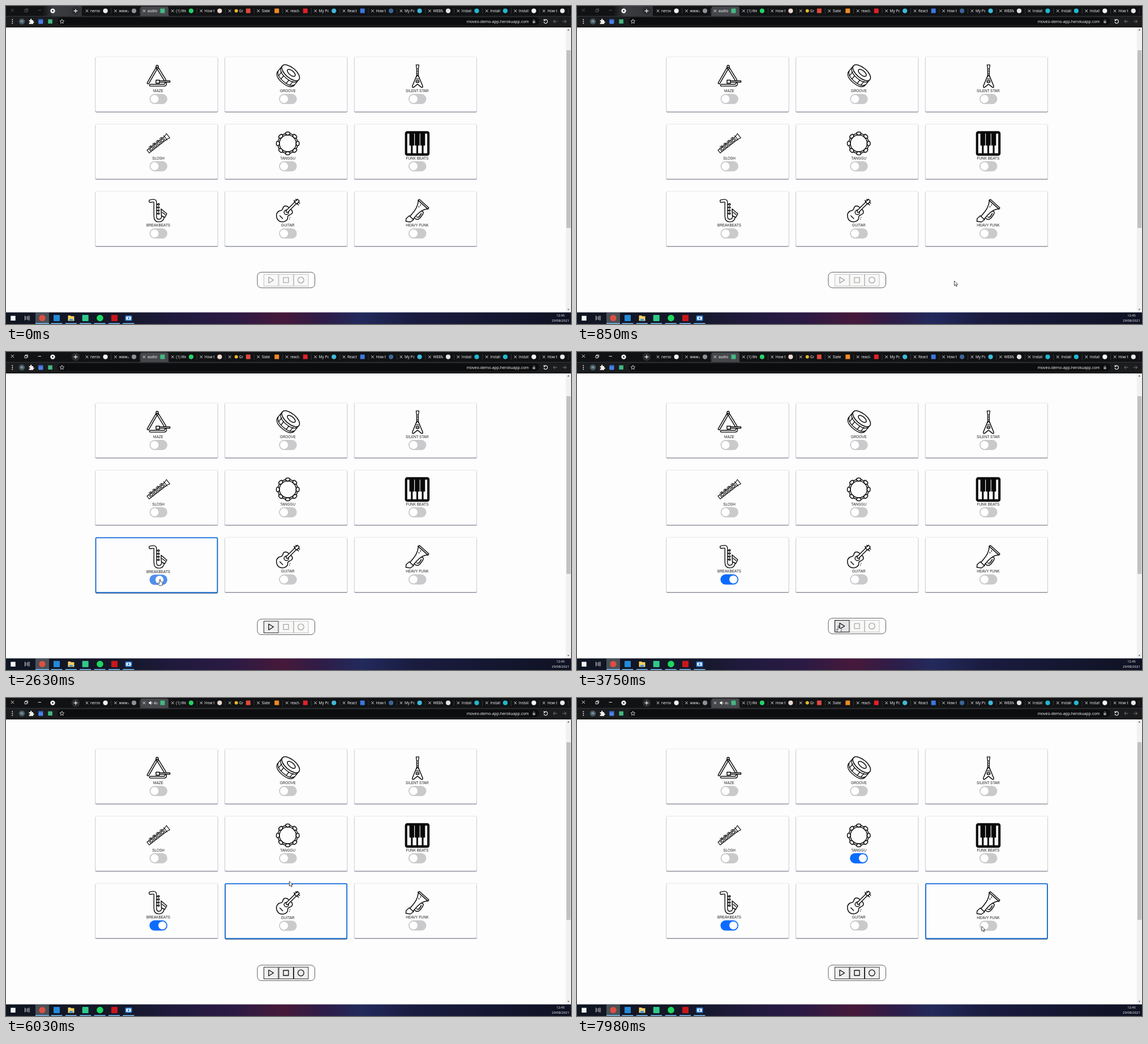
These frames come from a looping animation (998 by 561 pixels, 8 s). An HTML page:

```html
<!DOCTYPE html>
<html lang="en">
<head>
<meta charset="utf-8">
<title>Loop machine</title>
<style>
html,body{margin:0;width:100%;height:100%;overflow:hidden;background:#fdfdfd}
#stage{display:block;width:100vw;height:100vh}
text{font-family:"Open Sans","Noto Sans",sans-serif;fill:#fff;stroke:none}
.card text{font:6.4px "Liberation Sans",Arial,sans-serif;fill:#222;text-anchor:middle}
.box{fill:#fdfdfd;stroke:#d6d8e4;stroke-width:.6;filter:drop-shadow(0 1px .7px rgba(20,25,45,.6))}
.hover .box{stroke:#0b68da;stroke-width:1.7;transform:translate(.6px,.6px)}
.icon{fill:none;stroke:#0c0c0c;stroke-width:1.5;stroke-linejoin:round;stroke-linecap:round}
.btn rect{fill:#f8f8f6;stroke:#c3c3c6;stroke-width:1}
.btn path{fill:none;stroke:#98989c;stroke-width:1.1;stroke-linejoin:round}
.btn.on rect{fill:#efefef;stroke:#2a2a2a}
.btn.on path{stroke:#0a0a0a;stroke-width:1.3}
.btn.over rect{fill:#e4e4e6;stroke:#000}
.win{stroke:#f4f4f4;fill:none;stroke-width:.9}
.idle .win{stroke:#5c5c5c}
#glow{visibility:hidden}
.idle #glow{visibility:visible}
.cur path{fill:#fff;stroke:#111;stroke-width:.75;stroke-linejoin:round}
</style>
</head>
<body>
<svg id="stage" viewBox="0 0 998 561" preserveAspectRatio="none">
  <defs>
    <linearGradient id="bar">
      <stop offset="0" stop-color="#101522"/><stop offset=".22" stop-color="#15182b"/>
      <stop offset=".29" stop-color="#1f1a3c"/><stop offset=".4" stop-color="#2b1a44"/>
      <stop offset=".49" stop-color="#46193a"/><stop offset=".56" stop-color="#2e1c48"/>
      <stop offset=".63" stop-color="#222a5c"/><stop offset=".72" stop-color="#1a1c40"/>
      <stop offset="1" stop-color="#0f1222"/>
    </linearGradient>
    <linearGradient id="sheen">
      <stop offset="0" stop-color="#111214"/><stop offset=".3" stop-color="#3c3d40"/>
      <stop offset="1" stop-color="#323336"/>
    </linearGradient>
    <clipPath id="title"><rect x="5" y="0" width="18.5" height="18"/></clipPath>
  </defs>
  <rect width="998" height="561" fill="#fdfdfd"/>
  <g id="page"></g>
  <g id="frame"></g>
  <g id="cursor" class="cur">
    <path id="arrow" d="M0 0V8.6L2 6.8L3.4 9.8L4.8 9.2L3.4 6.3H6.1Z"/>
    <path id="hand" d="M-.9 .6Q0-.5 .9 .6V4L3.8 4.8Q5 5.2 4.8 6.6L4 11H-1.2L-3.6 7.6Q-3.8 6-2.4 6.4L-.9 7.6Z"/>
  </g>
</svg>
<script>
const $ = id => document.getElementById(id);
const LOOP = 8000, LAG = 60, GROW = 1.5;

const rect = (x, y, w, h, fill, r = 0) => `<rect x="${x}" y="${y}" width="${w}" height="${h}" rx="${r}" fill="${fill}"/>`;
const disc = (x, y, r, fill) => `<circle cx="${x}" cy="${y}" r="${r}" fill="${fill}"/>`;
const line = (d, extra = '') => `<path d="${d}" ${extra}/>`;
const text = (x, y, size, s, extra = '') => `<text x="${x}" y="${y}" font-size="${size}" ${extra}>${s}</text>`;
const tube = (d, w = 4.6, inner = 1.7) =>
  line(d, `stroke-width="${w}"`) + line(d, `stroke="#fdfdfd" stroke-width="${inner}"`);
const ring = (n, f) => Array.from({length: n}, (_, i) => f(i)).join('');

// Instruments, each in a 42 x 42 box
const icons = {
  triangle: tube('M18 7L3 33') + tube('M20 7L33 28') + tube('M7 37H31Q34 37 34 34') +
    line('M17 8V4Q17 1.6 19 1.6T21 4V8') +
    line('M17 28H23V33.4H17ZM23 29.2H41.5V31.8H23Z', 'fill="#fdfdfd"'),
  drum: '<g transform="rotate(40 21 21)"><ellipse cx="21" cy="13" rx="19" ry="9"/><ellipse cx="22" cy="12.5" rx="8.5" ry="4"/>' +
    line('M2 13V27Q4 36 21 36T40 27V13M2 16.5Q4 25.5 21 25.5T40 16.5M2 24Q4 33 21 33T40 24', 'stroke-width="1.3"') +
    line('M8 22V30M15 25V32.5M27 25V32.5M34 22V30', 'stroke-width="1.3"') + '</g>',
  vee: line('M19 1H24L23 8H20ZM20 8V22M23 8V22M20 12H23M20 16H23M20 19H23', 'stroke-width="1.3"') +
    line('M20 20L12.4 38.5Q12 42 15 40.4L21.5 35L28 40.4Q31 42 30.6 38.5L23 20Z') +
    line('M19.5 26H23.5M19 29H24V32H19Z'),
  flute: '<g transform="rotate(-38 21 21)" stroke-width="1.1">' + line('M-2 18H38L43 16V26L38 24.5H-2Z') +
    ring(4, i => `<circle cx="${6 + i * 8}" cy="21.2" r="2.1"/>` + line(`M${4 + i * 8} 16H${8 + i * 8}V18M${10 + i * 8} 18V24.5`)) +
    line('M2 18V24.5M37 16V26') + '</g>',
  tambourine: '<circle cx="21" cy="21" r="17.6"/><circle cx="21" cy="21" r="14.8"/>' +
    ring(8, i => `<g transform="rotate(${i * 45} 21 21)">` +
      line('M17 3.4Q17 .8 21 .8T25 3.4Q24 6.4 21 6.4T17 3.4Z', 'fill="#fdfdfd"') + '</g>'),
  piano: rect(0, 0, 42, 42, '#080808', 3.5) +
    ring(4, i => rect(2.6 + i * 9.6, 3, 8, 36.2, '#fdfdfd')) +
    ring(3, i => rect(7.9 + i * 9.6, 2.5, 7, 21.5, '#080808')),
  sax: tube('M7 4.2L12.5 3.4Q15.6 3.4 15.6 7V31Q15.6 38.6 22 38.6Q28.4 38.6 29.4 31', 6, 3.2) +
    line('M26 18L36 26.5L32.5 33L26.5 30Z', 'fill="#fdfdfd"') + line('M28 24L33 28') +
    ring(4, i => `<circle cx="21.5" cy="${10 + i * 5.4}" r="1.4"/>` + line(`M18 ${10 + i * 5.4}H20`)),
  guitar: line('M21 14Q14 10 12 18Q11 21 6 21.5Q-.5 25 1.4 33Q4 42 14 40.4Q21 39 21 32.5Q21 29 25 28.4Q31.5 26 28 20Z') +
    '<circle cx="18.5" cy="24" r="4"/>' + line('M7 30L12 35M25 33V33.1M24 36V36.1') + tube('M20 22L36 6', 5.4, 2.5) +
    line('M32.5 5.5L38 .8L41.4 4L37 9.5Z', 'fill="#fdfdfd"') + line('M32 3L34 5M35 1L37 3M38 9L40 11M40 6L42 8'),
  trumpet: line('M22.4 2.6L25 1.2L41.4 16L40 18.4Z') + line('M23 3.4C22 12 20 18 8 31M39.4 18C30 19 24 23 13.5 36.5') +
    line('M7 30L14.5 37L9 41L1 40L1.4 35Z') + line('M16 34Q21 39 26 34L31 27Q33 22 29 22M20 32Q23 34 25 31L28 26') +
    line('M24 13V15M27 10V12', 'stroke-width="1.2"')
};
const tracks = [
  ['MAZE', 'triangle'], ['GROOVE', 'drum'], ['SILENT STAR', 'vee'],
  ['SLOSH', 'flute'], ['TANGGU', 'tambourine'], ['FUNK BEATS', 'piano'],
  ['BREAKBEATS', 'sax'], ['GUITAR', 'guitar'], ['HEAVY FUNK', 'trumpet']
].map(([name, icon], i) => ({name, icon, x: 158 + (i % 3) * 228.7, y: 89.8 + Math.floor(i / 3) * 118.6, row: Math.floor(i / 3)}));
tracks[6].start = 2480;
tracks[4].start = 6850;

const glyphs = ['M464 478.3L472.6 483.5L464 488.7Z', 'M490 479H499V488H490Z', 'M515.6 483.5A5.3 5.3 0 1 1 526.2 483.5A5.3 5.3 0 1 1 515.6 483.5Z'];

$('page').innerHTML = tracks.map(c => `<g class="card">
  <rect class="box" width="216" height="96.5" rx="1.5"/>
  <g class="inner"><g class="icon" transform="translate(90 13)">${icons[c.icon]}</g>
  ${text(111, 62.3, 6.4, c.name)}
  ${rect(95.5, 65.3, 31.5, 18, '#cacacc', 9)}<g class="lit">${rect(95.5, 65.3, 31.5, 18, '#0a6cff', 9)}</g>
  <circle class="knob" cx="104.4" cy="74.3" r="7.1" fill="#fff"/></g></g>`).join('') +
  `<g id="deck"><rect x="444" y="469.7" width="101.5" height="27.4" rx="7" fill="#fdfdfd" stroke="#5d5d62"/>` +
  glyphs.map((d, i) => `<g class="btn"><rect x="${455.5 + i * 26.5}" y="473.4" width="25.5" height="20.6"/>${line(d)}</g>`).join('') + '</g>';

// Browser tabs: title, favicon colour, square or round
const tabs = [
  ['nerov', '#f2f2f2'], ['www.a', '#8d9196'], ['audio', '#41b883', 1], ['(1) We', '#25d366'], ['How t', '#ecd8cc'],
  ['Gr', '#e0483c', 1], ['Slate', '#f08a24', 1], ['react-', '#e3202a', 1], ['My Po', '#3fb9d8'], ['React', '#3a78e0', 1],
  ['How t', '#3d6496'], ['My Po', '#3fb9d8'], ['WEBM', '#e4e4e4'], ['Install', '#22b8cf'], ['Install', '#22b8cf'],
  ['Install', '#f4f4f4'], ['How t', '#e8e8e8']
];
const tabMarkup = ([name, color, square], i) => {
  const live = i === 2, chick = i === 5;
  return `<g transform="translate(${143 + i * 50.45} 0)">` +
    (live ? line('M-9 18Q-6.5 18 -6.5 14V4Q-6.5 1 -3.5 1H40Q43 1 43 4V14Q43 18 45.5 18Z', 'fill="#46474b"') : rect(42.6, 4, .6, 10, '#4c4c50')) +
    line('M-2.3 6.3L2.3 10.9M2.3 6.3L-2.3 10.9', 'stroke="#f0f0f0" stroke-width=".9"') +
    (chick ? disc(11.5, 8.6, 3, '#e8b62c') : '') +
    `<g clip-path="url(#title)">` +
    (live ? `<g id="plain">${text(6, 11, 6.5, name)}</g><g id="loud">${line('M8.5 7.3H10L12.3 5.3V12L10 10H8.5Z', 'fill="#fff"')}${line('M13.4 6.8Q14.8 8.6 13.4 10.5', 'fill="none" stroke="#fff" stroke-width=".7"')}${text(17, 11, 6.5, 'au')}</g>`
      : text(chick ? 16.5 : 6, 11, 6.5, name)) + '</g>' +
    (square ? rect(28.6, 4.6, 8, 8, color, .5) : disc(32.6, 8.6, 4.1, color)) + '</g>';
};

const taskIcons = [
  disc(64, 550.5, 5.6, '#dd4f40'), rect(84, 545, 11, 11, '#2489d8', 1),
  line('M109.5 546H114L115 547.3H120.5V555.5H109.5Z', 'fill="#f5cf63"') + rect(112, 552, 6, 3.5, '#3f9bdc'),
  rect(134.7, 545, 11, 11, '#2fc98a', 1), disc(166, 550.5, 5.8, '#1ed760'),
  rect(186, 545, 11, 11, '#c8171b', 1),
  rect(210.5, 546, 12, 9.5, '#2f7fd6', 1.5) + rect(212.3, 548, 8.4, 5.6, '#f2f7ff', 1) + disc(216.5, 550.8, 1.7, '#2f7fd6')
];

$('frame').innerHTML =
  // scrollbar
  rect(988.8, 37, 9.2, 504, '#f1f1f1') + rect(990, 78, 7.2, 313.5, '#c1c1c1') +
  line('M991.6 43.2L993.4 40.8L995.2 43.2ZM991.6 534.4L993.4 536.8L995.2 534.4Z', 'fill="#555"') +
  // tab strip
  rect(0, 0, 998, 18, '#111214') + `<g id="glow">${rect(64, 0, 70, 18, 'url(#sheen)')}</g>` + disc(123, 8.6, 7.2, '#2c2d30') +
  line('M119.6 8.6H126.4M123 5.2V12', 'stroke="#fff" stroke-width="1.1"') +
  disc(82.5, 8.6, 4.2, '#f5f5f5') + disc(82.5, 8.6, 1.4, '#222') +
  line('M8.8 4.8L14 10M14 4.8L8.8 10', 'class="win"') + line('M33 6.5H37V10.5H33ZM34.4 6.4V5H38.4V9H37', 'class="win"') +
  line('M56.5 7.6H62', 'class="win"') + tabs.map(tabMarkup).join('') +
  // address bar
  rect(0, 18, 998, 19.5, '#1b1c1e') + rect(0, 17.6, 998, 1.2, '#35363a') + rect(91, 20.2, 851, 13.6, '#0c0d0e', 6.8) + rect(0, 36, 998, 1.5, '#0a0a0a') +
  [23.9, 27.2, 30.5].map(y => disc(11.3, y, .95, '#eee')).join('') +
  disc(28, 27.3, 5.3, '#455a64') + text(28, 29.3, 5.5, 'N', 'text-anchor="middle"') +
  line('M40.6 25H43Q42.4 22.6 44.2 22.6T45.4 25H48V27.6Q49.8 27 49.8 28.4T48 29.6V31.8H40.6V29.4Q42.6 29.4 42.6 28.2T40.6 27Z', 'fill="#f2f2f2"') +
  rect(57.2, 23.2, 8.2, 8.2, '#4a82e8', .8) + rect(57.2, 23.2, 8.2, 2, '#2b5fc4', .6) + rect(74.3, 23.4, 7.6, 7.6, '#41b883', .5) +
  line('M98.8 23.2L99.9 25.9L102.7 26.1L100.5 27.9L101.2 30.7L98.8 29.2L96.4 30.7L97.1 27.9L94.9 26.1L97.7 25.9Z', 'fill="none" stroke="#e8e8e8" stroke-width=".8"') +
  text(923.5, 29.6, 6.9, 'moveo-demo-app.herokuapp.com', 'text-anchor="end"') +
  rect(930.3, 26.4, 4.4, 3.8, '#9a9a9c', .4) + line('M931.2 26.4V25Q932.5 22.8 933.8 25V26.4', 'fill="none" stroke="#9a9a9c" stroke-width=".8"') +
  line('M950.9 24.8A3.3 3.3 0 1 1 950 28M950.2 23.2V25.8H952.8', 'fill="none" stroke="#f4f4f4" stroke-width="1.1"') +
  line('M973.5 27.2H966.8M969.8 24.2L966.8 27.2L969.8 30.2M983 27.2H989.7M986.7 24.2L989.7 27.2L986.7 30.2', 'fill="none" stroke="#77787b" stroke-width="1"') +
  // taskbar
  rect(0, 540.5, 998, 20.5, 'url(#bar)') + rect(52, 541, 24, 20, '#4a5058') +
  rect(8.3, 546.6, 8.4, 8.4, '#f5f5f5') +
  line('M33.5 546.4V549M33.5 552V554.6M39 546.4V549M39 552V554.6M33.5 549H39V552H33.5ZM41.2 546.4V554.6', 'fill="none" stroke="#e8e8e8" stroke-width=".8"') +
  taskIcons.map((s, i) => rect(i ? 54 + i * 25.4 : 52, 559.4, i ? 20 : 24, 1.6, '#76b9ed') + s).join('') +
  text(979.5, 548.2, 5.7, '12:45', 'text-anchor="middle"') + text(979.5, 557.2, 5.8, '29/08/2021', 'text-anchor="middle"');

// Pointer path: time, x, y
const path = [
  [0, 1040, 520], [180, 1040, 520], [850, 667, 485], [1530, 298, 388], [1850, 272, 401], [2960, 272, 401],
  [3270, 350, 444], [3560, 442, 479], [3750, 462, 483], [3950, 465, 483], [5670, 465, 483],
  [6030, 500.5, 323.5], [6410, 496.5, 288], [7540, 496.5, 288], [7980, 714.5, 402.5], [8000, 720, 405]
];
const slope = (i, k) => (path[i + 1][k] - path[i][k]) / (path[i + 1][0] - path[i][0]);
const tangent = (i, k) => {
  if (i === 0 || i === path.length - 1) return 0;
  const a = slope(i - 1, k), b = slope(i, k);
  return a * b <= 0 ? 0 : 2 * a * b / (a + b);
};
function pointer(t) {
  t = Math.max(0, t);
  let i = 0;
  while (i < path.length - 2 && t >= path[i + 1][0]) i++;
  const h = path[i + 1][0] - path[i][0], u = (t - path[i][0]) / h, v = 1 - u;
  return [1, 2].map(k => path[i][k] * v * v * (1 + 2 * u) + path[i + 1][k] * u * u * (3 - 2 * u) +
    h * (tangent(i, k) * u * v * v - tangent(i + 1, k) * u * u * v));
}
const inside = ([px, py], x, y, w, h) => px >= x && px <= x + w && py >= y && py <= y + h;
const ease = p => { p = Math.min(1, Math.max(0, p)) ** .55; return p * p * (3 - 2 * p); };

const cards = [...document.querySelectorAll('.card')].map(el => ({
  el, box: el.querySelector('.box'), inner: el.querySelector('.inner'), lit: el.querySelector('.lit'), knob: el.querySelector('.knob')
}));
const buttons = [...document.querySelectorAll('.btn')];

function render(t) {
  const now = pointer(t), felt = pointer(t - LAG);
  const hot = tracks.findIndex(c => inside(felt, c.x, c.y, 216, 97));
  const hotRow = hot < 0 ? 9 : tracks[hot].row;
  let hand = false;

  cards.forEach((c, i) => {
    const {x, y, row, start} = tracks[i], over = i === hot;
    c.el.setAttribute('transform', `translate(${x} ${y + (row > hotRow ? GROW : 0)})`);
    c.el.classList.toggle('hover', over);
    c.box.setAttribute('width', over ? 214.8 : 216);
    c.box.setAttribute('height', over ? 95.3 + GROW : 96.5);
    c.inner.setAttribute('transform', `translate(0 ${over ? .5 : 0})`);
    const on = start ? ease((t - start) / 400) : 0;
    c.lit.setAttribute('opacity', on);
    c.knob.setAttribute('cx', 104.4 + 13.8 * on);
    hand = hand || inside(felt, x + 95.5, y + 65, 31.5, 18.5);
  });

  $('deck').setAttribute('transform', `translate(0 ${hot < 0 ? 0 : GROW})`);
  buttons.forEach((b, i) => {
    const on = t >= (i ? 4090 : 2480), over = on && inside(felt, 455 + i * 26.5, 473, 26, 21);
    b.classList.toggle('on', on);
    b.classList.toggle('over', over);
    hand = hand || over;
  });

  $('frame').classList.toggle('idle', t < 2400);
  const loud = t >= 4250;
  $('plain').style.display = loud ? 'none' : '';
  $('loud').style.display = loud ? '' : 'none';
  $('cursor').setAttribute('transform', `translate(${now[0]} ${now[1]})`);
  $('hand').style.display = hand ? '' : 'none';
  $('arrow').style.display = hand ? 'none' : '';
}

const begin = performance.now();
function tick() {
  render((performance.now() - begin) % LOOP);
  requestAnimationFrame(tick);
}
tick();
</script>
</body>
</html>
```
